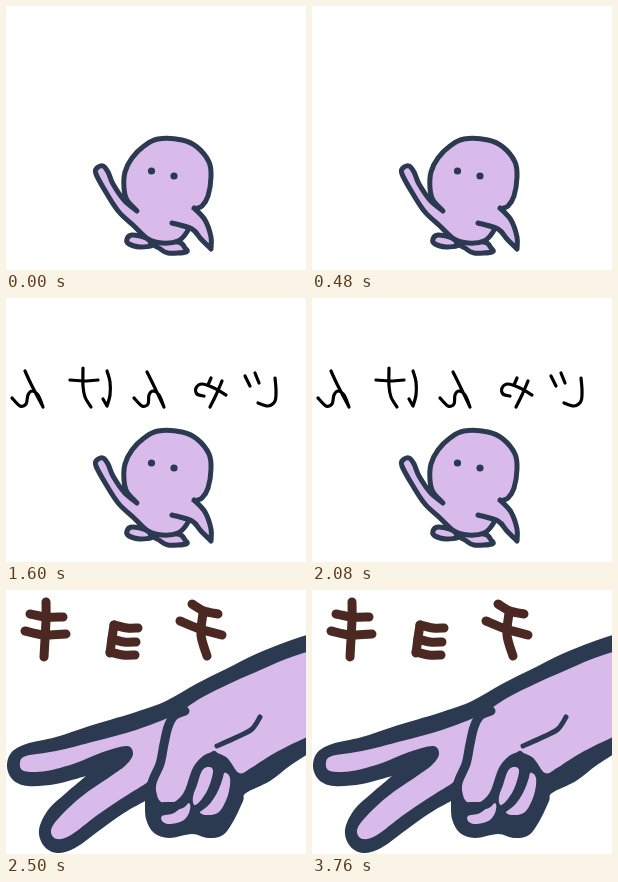
An HTML page that plays this animation: 300x264 px, repeating every 4.6 s.

```html
<!DOCTYPE html>
<html lang="ja">
<head>
<meta charset="utf-8">
<title>じゃんけん</title>
<style>
html, body { margin: 0; width: 100%; height: 100%; overflow: hidden; background: #fff; }
svg { display: block; width: 100vw; height: 100vh; }
path { fill: none; stroke-linecap: round; stroke-linejoin: round; }
.skin path { fill: #d9bbeb; stroke: #2b3a50; stroke-width: 5; }
.skin circle { fill: #2b3a50; }
.ink path { stroke: #000; stroke-width: 3.2; }
.brown path { stroke: #4b2922; stroke-width: 9; }
.big .edge { fill: #2b3a50; }
.big .fill { fill: #d9bbeb; }
.big .line { stroke: #2b3a50; }
.scene { visibility: hidden; animation: 4600ms step-end infinite; }
#up { animation-name: up; }
#side { animation-name: side; }
#call { animation-name: call; }
#call2 { animation-name: call2; }
#rush { animation-name: rush; }
#hand { animation-name: hand; }
@keyframes up {
  0%, 34.7826% { visibility: visible; }
  17.3913%, 52.1739%, 100% { visibility: hidden; }
}
@keyframes side {
  0%, 34.7826%, 100% { visibility: hidden; }
  17.3913% { visibility: visible; }
}
@keyframes call {
  0%, 52.1739%, 100% { visibility: hidden; }
  17.3913% { visibility: visible; }
}
@keyframes call2 {
  0%, 52.1739%, 100% { visibility: hidden; }
  34.7826% { visibility: visible; }
}
@keyframes rush {
  0%, 54.3478%, 100% { visibility: hidden; }
  52.1739% { visibility: visible; }
}
@keyframes hand {
  0% { visibility: hidden; }
  54.3478%, 100% { visibility: visible; }
}
</style>
</head>
<body>
<svg viewBox="0 0 300 264" preserveAspectRatio="none">
  <!-- data-p: points of a smooth curve, a repeated point is a corner, z closes it -->
  <g id="up" class="scene skin">
    <path data-p="126,229 121,233 123,238 134,241 146,239 140,232 z"/>
    <path data-p="145,236 153,242 162,247 180,246 179,242 172,236 z"/>
    <path data-p="131,205 131,205 121,194 118,182 119,166 126,152 138,140 152,133 176,134 191,141 203,156 205,171 202,190 196,200 188,204 185,215 181,226 172,235 156,237 142,233 128,220 113,206 101,188 90,168 91,162 97,160 102,166 107,178 118,194 z"/>
    <path data-p="166,217 186,223 195,233 205,243 205,243 205,231 199,214 188,202"/>
    <circle cx="145.500" cy="165" r="3.600"/>
    <circle cx="168" cy="170" r="3.600"/>
  </g>

  <g id="side" class="scene skin">
    <path data-p="126,229 122,233 124,238 135,241 146,239 140,232 z"/>
    <path data-p="145,236 153,242 162,247 181,246 179,242 172,236 z"/>
    <path data-p="130,204 130,204 119,194 116,182 117,166 124,152 136,140 150,134 174,134 189,141 201,155 203,170 200,189 194,200 188,204 185,215 181,226 172,235 156,237 142,233 129,222 106,215 87,207 75,201 74,196 80,194 91,197 107,203 z"/>
    <path data-p="166,217 186,223 195,231 205,239 205,239 204,228 198,213 188,203"/>
    <circle cx="143" cy="166" r="3.600"/>
    <circle cx="165.500" cy="170.500" r="3.600"/>
  </g>

  <g id="call" class="scene ink" role="img" aria-label="じゃん">
    <path data-p="269,80 270,92 269,103 262,108 252,105"/>
    <path data-p="239,78 244,88"/>
    <path data-p="249,75 253,85"/>
    <path data-p="220,97 208,90 196,86 190,90 191,96 198,98"/>
    <path data-p="205,80 202,87"/>
    <path data-p="216,83 210,97 204,109"/>
    <path data-p="141,74 147,86 158,109 158,109 153,97 147,93 143,97 142,106 136,108 128,100"/>
  </g>

  <g id="call2" class="scene ink" role="img" aria-label="けん">
    <path data-p="101,73 104,84 104,97 101,108 101,108 97,101"/>
    <path data-p="64,82 79,83 92,82"/>
    <path data-p="77,70 77,88 79,99 85,109"/>
    <path data-p="19,73 25,86 37,109 37,109 32,97 26,93 22,97 20,106 14,108 6,100"/>
  </g>

  <g id="rush" class="scene big">
    <path class="edge" data-p="310,12 250,13 223,16 204,28 190,45 178,70 173,93 179,112 195,124 215,129 216,143 226,157 245,166 262,172 280,180 310,180"/>
    <path class="fill" data-p="310,32 262,29 236,34 215,45 201,62 193,80 196,97 207,108 224,112 238,106 250,112 234,126 234,142 244,152 258,147 280,131 310,110"/>
    <path class="fill" data-p="310,125 290,133 273,146 270,154 284,152 310,138"/>
    <path class="fill" data-p="310,147 291,154 287,162 295,165 310,161"/>
    <path class="line" stroke-width="12" data-p="287,68 268,79 250,94 232,110 221,124"/>
    <path class="line" stroke-width="7" data-p="236,64 250,70"/>
    <path class="line" stroke-width="8" data-p="221,92 237,86 254,80"/>
  </g>

  <g id="hand" class="scene">
    <g class="big">
      <path class="edge" data-p="310,42 280,52 250,64 220,79 190,94 160,111 130,122 90,134 50,147 20,154 5,163 1,177 7,190 22,196 50,194 80,186 80,186 60,203 42,220 33,240 38,256 51,263 69,258 94,240 118,223 139,211 139,211 140,229 148,243 163,248 186,244 202,248 217,245 228,230 237,211 240,203 264,191 285,175 310,159"/>
      <path class="fill" data-p="310,59 280,69 250,82 225,93 195,108 168,125 130,140 90,151 50,161 20,166 14,173 18,181 40,181 70,173 97,162 121,156 127,164 120,175 105,186 75,207 51,230 45,242 51,249 65,245 90,226 115,209 139,194 147,188 153,210 166,213 178,202 188,176 203,163 220,167 233,183 245,178 262,167 282,156 310,143"/>
      <path class="fill" data-p="156,226 168,223 182,213 184,220 178,230 165,234 157,232 z"/>
      <path class="fill" data-p="195,182 203,177 207,182 201,201 190,215 187,207 z"/>
      <path class="fill" data-p="218,183 224,188 222,205 213,222 200,225 194,221 206,210 213,196 z"/>
      <path class="line" stroke-width="9" data-p="179,121 168,126 162,137 158,154 154,174 146,193 145,214"/>
      <path class="line" stroke-width="8" data-p="208,165 193,178 186,197 176,214 158,216"/>
      <path class="line" stroke-width="8" data-p="204,169 214,175 211,193 201,211 188,221"/>
      <path class="line" stroke-width="5" data-p="254,127 246,139 231,147 211,156"/>
    </g>
    <g class="brown" role="img" aria-label="チョキ">
      <path data-p="40,12 40,30 38,67"/>
      <path data-p="24,24 40,27 57,27"/>
      <path data-p="19,41 38,45 60,44"/>
      <path data-p="108,35 106,48 104,63"/>
      <path data-p="108,35 121,38 132,38"/>
      <path data-p="106,49 118,52 130,52"/>
      <path data-p="104,62 117,65 129,65"/>
      <path data-p="186,14 198,21 212,24"/>
      <path data-p="174,31 194,39 216,45"/>
      <path data-p="197,23 195,45 201,66"/>
    </g>
  </g>
</svg>
<script>
// Catmull-Rom spline through the listed points
function spline(text) {
  const closed = text.endsWith('z');
  const pts = text.replace(' z', '').split(' ').map(p => p.split(',').map(Number));
  const n = pts.length;
  const at = i => closed ? pts[(i + n) % n] : pts[Math.max(0, Math.min(n - 1, i))];
  let d = 'M' + pts[0];
  for (let i = 0; i < (closed ? n : n - 1); i++) {
    const [a, b, c, e] = [at(i - 1), at(i), at(i + 1), at(i + 2)];
    if (b[0] === c[0] && b[1] === c[1]) continue;
    const c1 = b.map((v, k) => v + (c[k] - a[k]) / 6);
    const c2 = c.map((v, k) => v - (e[k] - b[k]) / 6);
    d += `C${c1} ${c2} ${c}`;
  }
  return d + (closed ? 'Z' : '');
}

let seed = 7;
function rand() {
  seed = (seed * 16807) % 2147483647;
  return seed / 2147483647;
}

// Slanted speed hairs along a contour
function hairs(path, color, gap, size) {
  let d = '';
  for (let s = 0; s < path.getTotalLength(); s += gap * (0.5 + rand())) {
    const p = path.getPointAtLength(s);
    const len = size * (0.3 + rand());
    const x = p.x - len * 0.4, y = p.y + len * 0.46;
    d += `M${x.toFixed(1)} ${y.toFixed(1)}l${(len * 0.75).toFixed(1)} ${(-len * 0.86).toFixed(1)}`;
  }
  const el = document.createElementNS('http://www.w3.org/2000/svg', 'path');
  el.setAttribute('d', d);
  el.setAttribute('stroke', color);
  el.setAttribute('stroke-width', 1.3);
  path.parentNode.append(el);
}

document.querySelectorAll('[data-p]').forEach(p => p.setAttribute('d', spline(p.dataset.p)));
const rush = document.getElementById('rush');
const pick = name => [...rush.querySelectorAll(name)];
pick('.fill').forEach(p => hairs(p, '#d9bbeb', 5, 11));
pick('.fill, .line').forEach(p => hairs(p, '#2b3a50', 5, 10));
pick('.edge').forEach(p => hairs(p, '#2b3a50', 2.6, 14));
</script>
</body>
</html>
```
